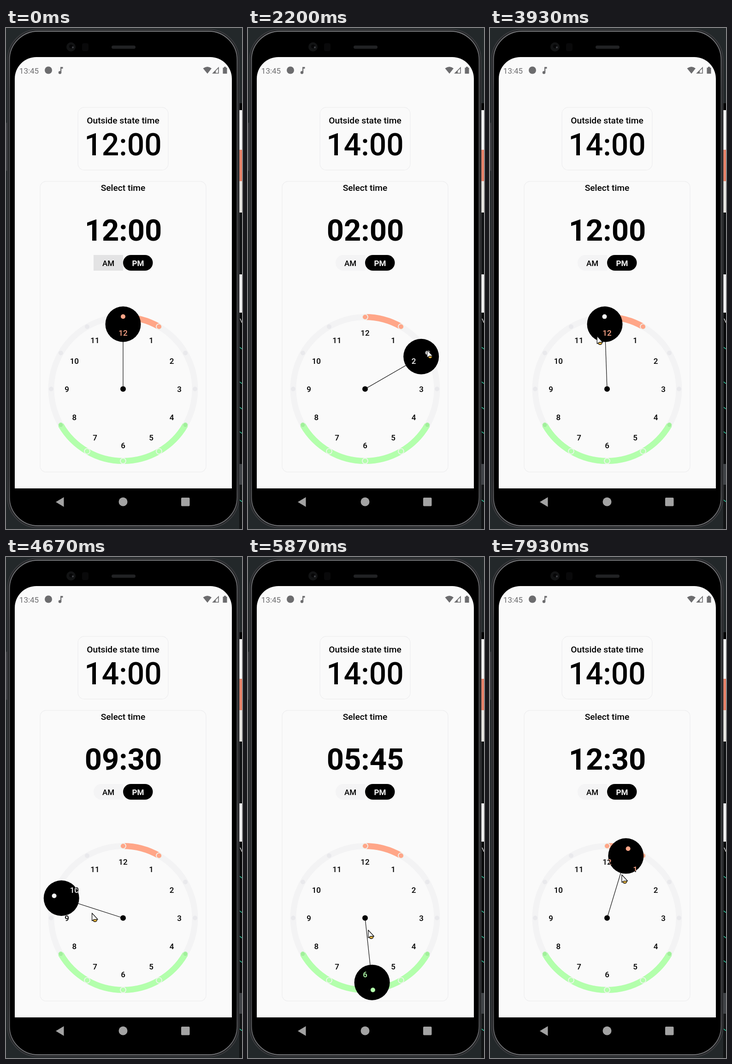
Animation, 512 px wide and 1086 px high, one loop 8000 ms. Source, as an HTML page:

```html
<!DOCTYPE html>
<html lang="en">
<head>
<meta charset="utf-8">
<title>Time picker</title>
<style>
  html, body { margin: 0; width: 100%; height: 100%; overflow: hidden; background: #23282a; }
  svg { display: block; width: 100vw; height: 100vh; }
  text { font-family: Roboto, "Open Sans", sans-serif; text-anchor: middle; }
  .mid { font-weight: 500; }
  .bold { font-weight: 700; }
</style>
</head>
<body>
<svg viewBox="0 0 512 1086">
  <defs>
    <linearGradient id="rim" x2="0" y2="1">
      <stop offset="0" stop-color="#7a7b7e"/>
      <stop offset=".12" stop-color="#545558"/>
      <stop offset=".9" stop-color="#4a4b4e"/>
      <stop offset="1" stop-color="#77787b"/>
    </linearGradient>
    <clipPath id="inDisc"><circle id="clip" r="38.5"/></clipPath>
  </defs>

  <!-- Desktop behind the phone -->
  <rect width="512" height="1086" fill="#23282a"/>
  <g id="desk"></g>

  <!-- Phone body -->
  <rect x="0" y="205" width="4" height="105" rx="2" fill="#3d3f42"/>
  <rect x="3.5" y="3" width="502" height="1080" rx="66" fill="#1f2022" stroke="#3a3b3e" stroke-width="2"/>
  <rect x="7.5" y="7" width="494" height="1072" rx="62" fill="#000" stroke="url(#rim)" stroke-width="2"/>
  <rect x="229" y="38" width="52" height="7" rx="3.5" fill="#212224"/>
  <circle cx="141" cy="41" r="10" fill="#121314"/>
  <circle cx="141" cy="40" r="4" fill="#060607"/>
  <circle cx="145" cy="42" r="2" fill="#3f4044"/>
  <rect x="165" y="33" width="14" height="17" rx="4" fill="#09090a"/>
  <path d="M19 998V110A47 47 0 0 1 66 63H443A47 47 0 0 1 490 110V998Z" fill="#fafafa"/>

  <!-- Status bar -->
  <g fill="#6c6c6e">
    <text x="50" y="98.5" font-size="17">13:45</text>
    <circle cx="92" cy="91.5" r="8"/>
    <circle cx="117" cy="96.5" r="3.2"/>
    <path d="M118 84.5h5.5v3.5h-3.3v8.5h-2.200z"/>
    <path d="M427.500 87.500Q437 80.500 446 87.500L437 99Z"/>
    <path d="M449 98L461 86V98Z" fill="none" stroke="#6c6c6e" stroke-width="1.6"/>
    <path d="M455 98V92L449 98Z"/>
    <path d="M473 84h4v2h2.500v13h-9V86h2.500z"/>
  </g>

  <!-- Navigation bar -->
  <g fill="#a3a3a3">
    <path d="M108 1027.500L125.500 1017V1038Z"/>
    <circle cx="254" cy="1027" r="9.5"/>
    <rect x="380" y="1018" width="18.5" height="18.5" rx="2"/>
  </g>

  <!-- Cards -->
  <g fill="none" stroke="#efeff0" stroke-width="1.3">
    <rect x="156" y="172" width="196" height="136" rx="14"/>
    <rect x="74" y="332.5" width="360" height="630" rx="13"/>
  </g>
  <text class="mid" x="254" y="206.5" font-size="19.2">Outside state time</text>
  <text class="mid" id="saved" x="254" y="276" font-size="66"></text>
  <text class="mid" x="254" y="353" font-size="19.2">Select time</text>
  <text class="bold" id="picked" x="254.5" y="461" font-size="65"></text>

  <!-- AM / PM switch -->
  <path d="M254 492H207a17 17 0 0 0 0 34H254Z" fill="#f4f4f5"/>
  <rect id="press" x="190" y="492" width="64" height="34" fill="#e3e3e4"/>
  <rect x="254" y="492" width="64.5" height="34" rx="17" fill="#000"/>
  <text class="mid" x="222" y="516" font-size="17">AM</text>
  <text class="bold" x="286.5" y="516" font-size="17" fill="#fafafa">PM</text>

  <!-- Clock -->
  <g id="dial"></g>
  <line id="hand" x1="254" y1="782.5" stroke="#111" stroke-width="1.2"/>
  <circle cx="254" cy="782.5" r="6"/>
  <circle id="disc" r="38.5"/>
  <g id="inner" clip-path="url(#inDisc)"></g>
  <circle id="bead" r="5"/>

  <!-- Pointer -->
  <g id="pointer">
    <ellipse cx="6.5" cy="15" rx="4.3" ry="3.6" fill="#e0b040" stroke="#000" stroke-width="1.2"/>
    <path d="M0 0V16.500L4.500 13.500H12.500Z" fill="#fff" stroke="#111" stroke-width="1.3" stroke-linejoin="round"/>
  </g>
</svg>

<script>
const LOOP = 8000, STEP = 1000 / 15;
const CX = 254, CY = 782.5, RING = 156, LABELS = 122, DISC = 140.5;
const ORANGE = '#ffa688', GREEN = '#b3ffac', PALE = '#f6f6f6';
const $ = id => document.getElementById(id);

// [ms, degrees clockwise from 12]: a first drag to 2, then one long drag
// backwards around the dial that turns forward again just after 12
const handKeys = [[0, 0], [780, 0], [1680, 58], [1800, 60], [2700, 60], [3330, 47], [3930, -1.7],
  [4670, -72.5], [5870, -186.5], [7000, -255.8], [7670, -357], [7790, -360], [7930, -343.2], [8000, -341.2]];
// [ms, degrees, distance from the clock centre]
const pointerKeys = [[250, 24, 290], [620, 2, 159], [700, 2, 159], [1600, 57.8, 159], [2500, 57.8, 159],
  [3240, 45, 145], [3930, -10.4, 117], [4670, -81.5, 68], [5870, -195, 27], [7000, -261, 52.6],
  [7580, -357, 90], [7700, -360, 96], [7845, -343.2, 99], [7930, -341.2, 99], [8000, -341, 99]];
const RELEASE = 1700;

function add(parent, tag, attrs, text) {
  const el = document.createElementNS('http://www.w3.org/2000/svg', tag);
  set(el, attrs);
  if (text !== undefined) el.textContent = text;
  parent.append(el);
  return el;
}

function set(el, attrs) {
  for (const name in attrs) el.setAttribute(name, attrs[name]);
}

function polar(deg, r) {
  const a = deg * Math.PI / 180;
  return [CX + r * Math.sin(a), CY - r * Math.cos(a)];
}

function sample(keys, t) {
  if (t <= keys[0][0]) return keys[0].slice(1);
  const i = keys.findIndex(k => k[0] >= t);
  const [a, b] = [keys[i - 1], keys[i]];
  const f = (t - a[0]) / (b[0] - a[0]);
  return a.slice(1).map((v, j) => v + (b[j + 1] - v) * f);
}

const wrap = (v, n) => ((v % n) + n) % n;

function tint(deg) {
  if (deg <= 30) return ORANGE;
  return deg >= 120 && deg <= 240 ? GREEN : PALE;
}

function arc(from, to, color) {
  const d = `M${polar(from, RING)}A${RING} ${RING} 0 0 1 ${polar(to, RING)}`;
  add($('dial'), 'path', { d, fill: 'none', stroke: color, 'stroke-width': 13 });
}

function buildDesk() {
  const bands = [[163, 15, '#000'], [178, 86, '#f4f4f4'], [264, 68, '#e8836a'], [332, 68, '#e8e6e2'],
    [400, 134, '#101214'], [534, 83, '#f2f2f2'], [617, 328, '#08090a'], [945, 45, '#404347'], [990, 96, '#121415']];
  for (const [y, height, fill] of bands) add($('desk'), 'rect', { x: 506, y, width: 6, height, fill });
  for (const y of [695, 770, 825, 878, 1026])
    add($('desk'), 'path', { d: `M507 ${y - 3}l5 4`, stroke: '#2fc8a0', 'stroke-width': 1.6 });
  add($('desk'), 'path', { d: 'M508 630l4 9', stroke: '#d6d6d6', 'stroke-width': 1.6 });
}

function buildDial() {
  const dial = $('dial');
  add(dial, 'circle', { cx: CX, cy: CY, r: RING, fill: 'none', stroke: '#f3f3f4', 'stroke-width': 13 });
  arc(0, 30, ORANGE);
  arc(120, 240, GREEN);
  for (let h = 1; h <= 12; h++) {
    const deg = wrap(h * 30, 360);
    const [cx, cy] = polar(deg, RING);
    const color = tint(deg);
    const end = h === 4 || h === 8;
    if (color === PALE) add(dial, 'circle', { cx, cy, r: 5, fill: '#e9e9ec' });
    else if (end) add(dial, 'circle', { cx, cy, r: 5, fill: '#a0f09a', stroke: '#c4f4c0', 'stroke-width': 1 });
    else add(dial, 'circle', { cx, cy, r: 6, fill: color, stroke: '#eff3ee', 'stroke-width': 1.8 });
    const [x, ly] = polar(deg, LABELS);
    const label = { x, y: ly + 6, 'font-size': 17, class: 'mid' };
    add(dial, 'text', label, h);
    add($('inner'), 'text', { ...label, fill: color }, h);
  }
}

function clockText(deg) {
  const minutes = wrap(Math.round(deg / 7.5) * 15, 720);
  const pad = n => String(n).padStart(2, '0');
  return pad(Math.floor(minutes / 60) || 12) + ':' + pad(minutes % 60);
}

function draw(t) {
  const [deg] = sample(handKeys, t);
  const [cx, cy] = polar(deg, DISC);
  set($('disc'), { cx, cy });
  set($('clip'), { cx, cy });
  set($('hand'), { x2: cx, y2: cy });
  const [bx, by] = polar(deg, RING + 1);
  set($('bead'), { cx: bx, cy: by, fill: tint(wrap(deg, 360)) });
  $('picked').textContent = clockText(deg);
  $('saved').textContent = t < RELEASE ? '12:00' : '14:00';
  set($('press'), { opacity: Math.max(0, 1 - t / 270) });
  const [angle, radius] = sample(pointerKeys, t);
  set($('pointer'), {
    transform: `translate(${polar(angle, radius)})`,
    visibility: t < pointerKeys[0][0] ? 'hidden' : 'visible'
  });
}

function tick() {
  const t = performance.now() % LOOP;
  draw(Math.min(Math.floor((t + 5) / STEP) * STEP, LOOP));
  requestAnimationFrame(tick);
}

buildDesk();
buildDial();
tick();
</script>
</body>
</html>
```
